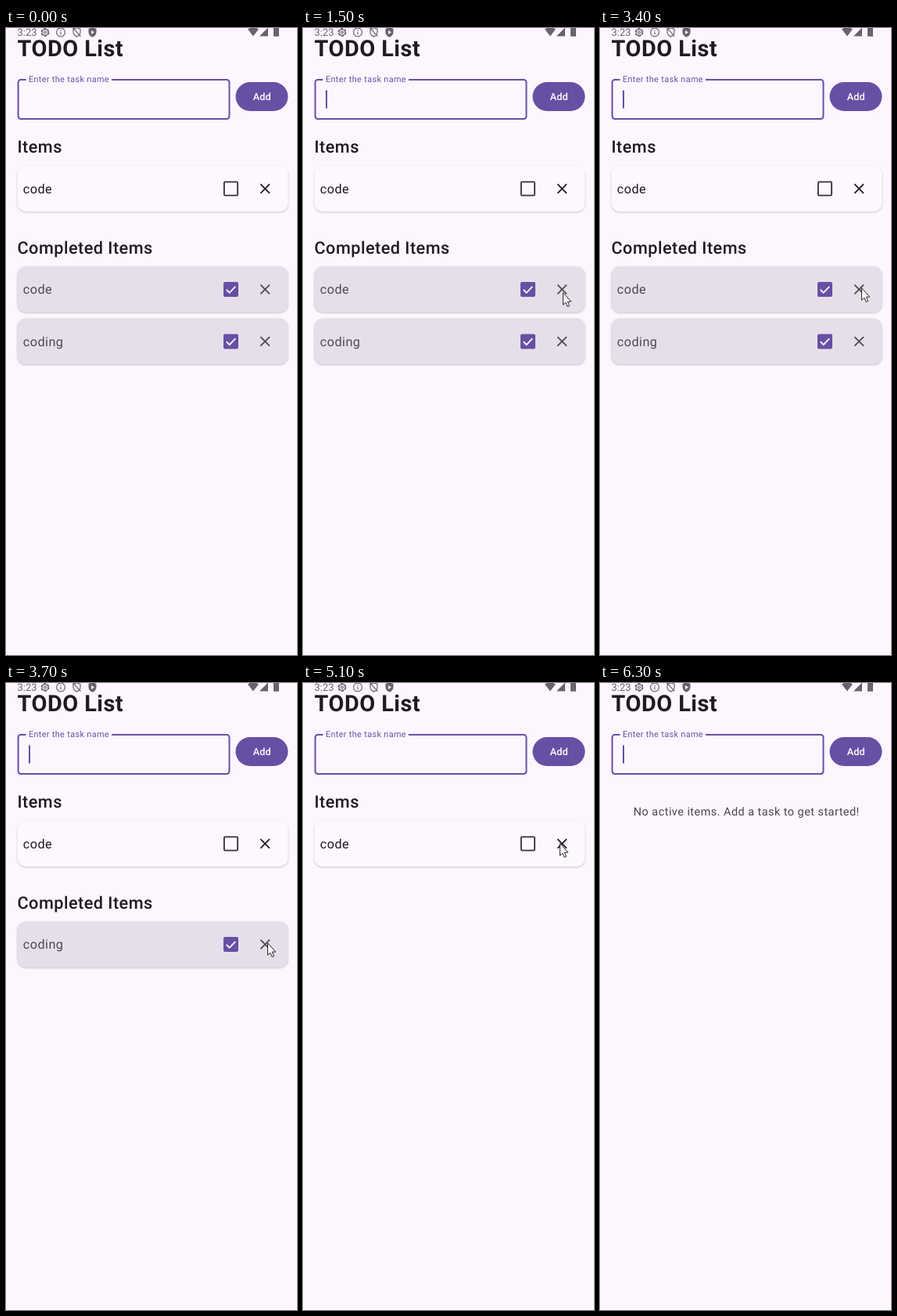
Recreate the animation shown at these times as an HTML page. Size 372 by 800 pixels, loop 6.8 s.

```html
<!DOCTYPE html>
<html lang="en">
<head>
<meta charset="utf-8">
<title>TODO List</title>
<style>
  html, body { margin: 0; width: 100%; height: 100%; overflow: hidden; background: #fef6ff; }
  svg {
    display: block; width: 372px; height: 800px;
    --fill: #fef7ff; --ink: #1d1b20; --box: none; --edge: #35313a; --tick: none;
  }
  .done { --fill: #e6dfe9; --ink: #4d4952; --box: #6750a4; --edge: #6750a4; --tick: #fff; }
  text {
    font-family: Roboto, sans-serif; letter-spacing: .452px;
    text-rendering: geometricPrecision; fill: var(--ink);
  }
  .title { font-size: 28.94px; font-weight: 700; }
  .head { font-size: 21.7px; font-weight: 500; }
  .task { font-size: 16.28px; }
  .empty { font-size: 14.47px; fill: #49454f; }
  .label { font-size: 10.85px; letter-spacing: .36px; fill: #6750a4; }
  .button { font-size: 12.66px; font-weight: 500; letter-spacing: .09px; fill: #fff; }
  .clock { font-size: 13px; letter-spacing: 0; fill: #68636b; }
  .card { fill: var(--fill); filter: drop-shadow(0 1px 1px rgba(0, 0, 0, .22)); }
  .box { fill: var(--box); stroke: var(--edge); stroke-width: 1.8; }
  .tick { fill: none; stroke: var(--tick); stroke-width: 1.8; }
  .cross { fill: none; stroke: var(--ink); stroke-width: 1.8; }
  .status { fill: none; stroke: #68636b; stroke-width: 1.2; }
  .solid { fill: #68636b; stroke: none; }
</style>
</head>
<body>
<svg viewBox="0 0 372 800">
  <defs>
    <g id="row">
      <rect class="card" x="14.5" width="346" height="58.5" rx="10.8"/>
      <rect class="box" x="278.9" y="20.7" width="17.2" height="17.2" rx="1"/>
      <path class="tick" d="M281.8 29.6l3.9 4 7.6-8"/>
      <path class="cross" d="M325.4 23.5l11.6 11.6M337 23.5l-11.6 11.6"/>
    </g>
  </defs>

  <text class="clock" x="14.5" y="10">3:23</text>
  <g class="status">
    <circle cx="50" cy="5.5" r="4.6" stroke-width="1.7" stroke-dasharray="3 1.82"/>
    <circle cx="50" cy="5.5" r="3.9"/>
    <circle cx="50" cy="5.5" r="1.5"/>
    <circle cx="70" cy="5.5" r="5.4"/>
    <path d="M70 2.4v1.3M70 4.8v3.7"/>
    <path d="M86 1.4l4.5-1.7 4.5 1.7v3.9c0 2.7-2 4.8-4.5 5.8-2.5-1-4.5-3.1-4.5-5.8zM85.5-.2l10 10.8"/>
    <path class="solid" fill-rule="evenodd" d="M105.5 1l5-1.9 5 1.9v4.3c0 3.1-2.2 5.4-5 6.5-2.8-1.1-5-3.4-5-6.5zM109 3v5l4-2.5z"/>
    <path class="solid" d="M309 1.5Q316-3 323 1.5L316 10.5zM324 10.5L335-.5V10.5zM342 0h7v10.7h-7z"/>
  </g>
  <text class="title" x="14.5" y="36">TODO List</text>

  <path d="M25.5 66H19a3.4 3.4 0 0 0-3.4 3.4V112.6a3.4 3.4 0 0 0 3.4 3.4H282.1a3.4 3.4 0 0 0 3.4-3.4V69.4a3.4 3.4 0 0 0-3.4-3.4H135" fill="none" stroke="#6750a4" stroke-width="2"/>
  <text class="label" x="28.9" y="69">Enter the task name</text>
  <rect id="caret" x="29" y="79.5" width="2" height="23" fill="#6750a4"/>
  <rect x="293.5" y="69" width="67" height="37" rx="18.5" fill="#6750a4"/>
  <text class="button" x="315.7" y="92">Add</text>

  <g id="active">
    <text class="head" x="14.5" y="159">Items</text>
    <g transform="translate(0 175.7)"><use href="#row"/><text class="task" x="21.7" y="35">code</text></g>
  </g>
  <text id="empty" class="empty" x="187.3" y="169.3" text-anchor="middle">No active items. Add a task to get started!</text>

  <text id="finished" class="head" x="14.5" y="287.5">Completed Items</text>
  <g id="first" class="done" transform="translate(0 304.2)"><use href="#row"/><text class="task" x="21.7" y="35">code</text></g>
  <g id="second" class="done"><use href="#row"/><text class="task" x="21.7" y="35">coding</text></g>

  <path id="pointer" d="M.5.7V16.2L3.9 13.1 6.2 18.5 8.6 17.5 6.3 12.1H10.8Z" fill="#fff" stroke="#222" stroke-linejoin="round"/>
</svg>
<script>
  const LOOP = 6800, TICK = 100;
  const el = id => document.getElementById(id);
  const show = (id, on) => el(id).style.display = on ? '' : 'none';

  // Pointer stops: time, x, y
  const path = [
    [200, 322, 716], [500, 325, 560], [800, 328, 416], [1200, 331, 355], [1500, 332, 337],
    [1700, 332, 336], [2600, 332, 336], [2800, 334, 331], [3800, 334, 331],
    [3900, 334, 334], [4400, 334, 334], [4600, 332, 285], [4900, 327, 208],
    [5100, 328, 204], [5500, 328, 204], [5700, 326, 330], [6000, 321, 756]
  ];

  function pointerAt(t) {
    const i = path.findIndex(p => p[0] > t);
    if (i < 1) return path[path.length - 1].slice(1);
    const [a, b] = [path[i - 1], path[i]];
    const k = (t - a[0]) / (b[0] - a[0]);
    return [1, 2].map(n => Math.round(a[n] + (b[n] - a[n]) * k));
  }

  function draw() {
    const t = Math.floor(performance.now() % LOOP / TICK) * TICK;
    const firstGone = t >= 3700, secondGone = t >= 4400, empty = t >= 5400;
    show('caret', t >= 300 && Math.floor((t - 300) / 500) % 2 === 0);
    show('first', !firstGone);
    show('second', !secondGone);
    show('finished', !secondGone);
    show('active', !empty);
    show('empty', empty);
    el('second').setAttribute('transform', `translate(0 ${firstGone ? 304.2 : 370.6})`);
    show('pointer', t >= 200 && t < 6100);
    el('pointer').setAttribute('transform', `translate(${pointerAt(t)})`);
    requestAnimationFrame(draw);
  }
  draw();
</script>
</body>
</html>
```
